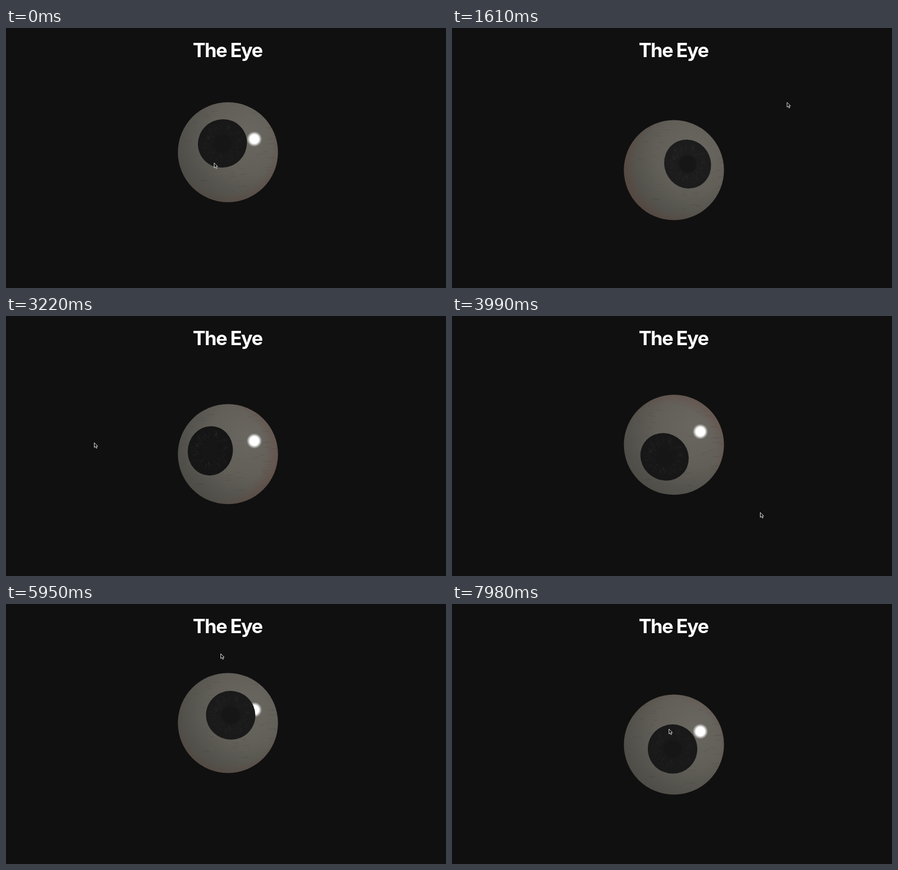
Write an HTML page with a canvas that moves like this. It is 800 by 473 pixels and loops after 8000 ms.

```html
<!DOCTYPE html>
<html lang="en">
<head>
<meta charset="utf-8">
<title>The Eye</title>
<style>
  html, body { margin: 0; width: 100%; height: 100%; overflow: hidden; background: #101010; }
  canvas { position: absolute; left: 0; top: 0; }
  h1 {
    position: absolute; left: 339.5px; top: 19px; margin: 0; white-space: nowrap;
    font: 700 35px Inter, "Liberation Sans", sans-serif;
    font-optical-sizing: none; letter-spacing: -1.5px; color: #fff;
  }
</style>
</head>
<body>
<h1>The Eye</h1>
<canvas id="stage" width="800" height="473"></canvas>
<script>
const ctx = document.getElementById('stage').getContext('2d');
const LOOP = 8000, STEP = 70;
const EYE_X = 403.5, EYE_R = 91, IRIS_R = 45, IRIS_DEPTH = 79;

// [time, x, y]
const gazePath = [
  [0, -10, -16], [450, 1, 8], [910, 18.5, 23], [1680, 24, -14], [2380, -5, -34],
  [3220, -32, -6], [3990, -17, 22], [4600, 13, 32], [5180, 33, 27.5],
  [5950, 5, -14], [6720, -46, 14], [7350, -26, 26], [7980, -2.5, 8]
];
const cursorPath = [
  [0, 378, 245], [450, 440, 370], [910, 592, 327], [1680, 600, 120], [2380, 386, 43],
  [3220, 160, 230], [3990, 560, 357], [4600, 690, 320], [5180, 737, 234],
  [5950, 390, 90], [6720, 41, 343], [7350, 270, 390], [7980, 394, 227]
];

function along(path, t) {
  let i = 0;
  while (i < path.length - 2 && t >= path[i + 1][0]) i++;
  const b = path[i], c = path[i + 1];
  const a = path[i - 1] || b, d = path[i + 2] || c;
  const span = c[0] - b[0], u = Math.min(1, (t - b[0]) / span);
  return [1, 2].map(k => {
    const inSlope = (c[k] - a[k]) / (c[0] - a[0]) * span;
    const outSlope = (d[k] - b[k]) / (d[0] - b[0]) * span;
    return b[k] * (1 + 2 * u) * (1 - u) ** 2 + inSlope * u * (1 - u) ** 2
      + c[k] * u * u * (3 - 2 * u) + outSlope * u * u * (u - 1);
  });
}

function randomFrom(seed) {
  return () => (seed = seed * 16807 % 2147483647) / 2147483647;
}

function radial(x, y, r, ...stops) {
  const g = ctx.createRadialGradient(x, y, 0, x, y, r);
  stops.forEach(([at, colour]) => g.addColorStop(at, colour));
  return g;
}

function disc(r, fill) {
  ctx.beginPath();
  ctx.arc(0, 0, r, 0, 7);
  ctx.fillStyle = fill;
  ctx.fill();
}

function drawBall(gx, gy) {
  disc(EYE_R, radial(38, -30, 155,
    [0, '#6a6761'], [.45, '#625f59'], [.75, '#54524c'], [1, '#4a4843']));
  disc(EYE_R, radial(gx * .6, gy * .6, 118,
    [0, 'rgba(105,60,50,0)'], [.72, 'rgba(105,60,50,0)'], [1, 'rgba(105,60,50,.4)']));

  ctx.save();
  ctx.clip();
  ctx.lineWidth = .7;
  const rand = randomFrom(71);
  for (let i = 0; i < 60; i++) {
    const x = (rand() * 2 - 1) * 88 + gx * .3, y = (rand() * 2 - 1) * 88 + gy * .3;
    ctx.strokeStyle = i % 4 ? 'rgba(50,47,43,.25)' : 'rgba(112,78,65,.3)';
    ctx.beginPath();
    ctx.moveTo(x, y);
    ctx.lineTo(x + 4 + rand() * 11, y + rand() * 4 - 2);
    ctx.stroke();
  }
  ctx.restore();
}

function drawHighlight() {
  ctx.save();
  ctx.translate(48, -24);
  disc(14, radial(0, 0, 14,
    [0, '#fff'], [.58, '#fff'], [.78, 'rgba(255,255,255,.5)'], [1, 'rgba(255,255,255,0)']));
  ctx.restore();
}

function drawIris(gx, gy) {
  const tilt = Math.atan2(gy, gx);
  const squash = Math.sqrt(1 - (gx * gx + gy * gy) / IRIS_DEPTH ** 2);
  const tone = Math.round(25 + gx * .12);
  ctx.save();
  ctx.translate(gx, gy);
  ctx.rotate(tilt);
  ctx.scale(squash, 1);
  ctx.rotate(-tilt);
  disc(IRIS_R, `rgb(${tone},${tone},${tone})`);
  ctx.lineWidth = .6;
  ctx.strokeStyle = `rgba(120,120,120,${.12 + (1 - squash) * .6})`;
  const rand = randomFrom(23);
  ctx.beginPath();
  for (let i = 0; i < 110; i++) {
    const a = rand() * Math.PI * 2, from = 19 + rand() * 15, to = from + 2 + rand() * 6;
    ctx.moveTo(Math.cos(a) * from, Math.sin(a) * from);
    ctx.lineTo(Math.cos(a) * to, Math.sin(a) * to);
  }
  ctx.stroke();
  disc(18, radial(0, 0, 18, [0, '#161616'], [.85, '#161616'], [1, 'rgba(22,22,22,0)']));
  ctx.restore();
}

function drawCursor(x, y) {
  ctx.save();
  ctx.translate(x, y);
  ctx.lineWidth = 1;
  if (x > 338 && x < 468 && y > 20 && y < 62) {
    ctx.strokeStyle = '#555';
    ctx.stroke(new Path2D('M-2-5L0-4L2-5M0-4V4M-2 5L0 4L2 5M-1 1H1'));
  } else {
    const arrow = new Path2D('M.5 .5V9.2L2.6 7.4L4.1 10.7L5.6 10L4.2 6.9H6.8Z');
    ctx.fillStyle = '#080808';
    ctx.strokeStyle = '#ddd';
    ctx.fill(arrow);
    ctx.stroke(arrow);
  }
  ctx.restore();
}

function render(now) {
  const t = Math.floor(now % LOOP / STEP) * STEP;
  const [gx, gy] = along(gazePath, t);
  ctx.clearRect(0, 0, 800, 473);
  ctx.save();
  ctx.translate(EYE_X, 238 + 24.1 * Math.cos(.000957 * t - 2.094));
  drawBall(gx, gy);
  drawHighlight();
  drawIris(gx, gy);
  ctx.restore();
  drawCursor(...along(cursorPath, t));
}

const start = performance.now();
function tick() {
  render(performance.now() - start);
  requestAnimationFrame(tick);
}
tick();
</script>
</body>
</html>
```
